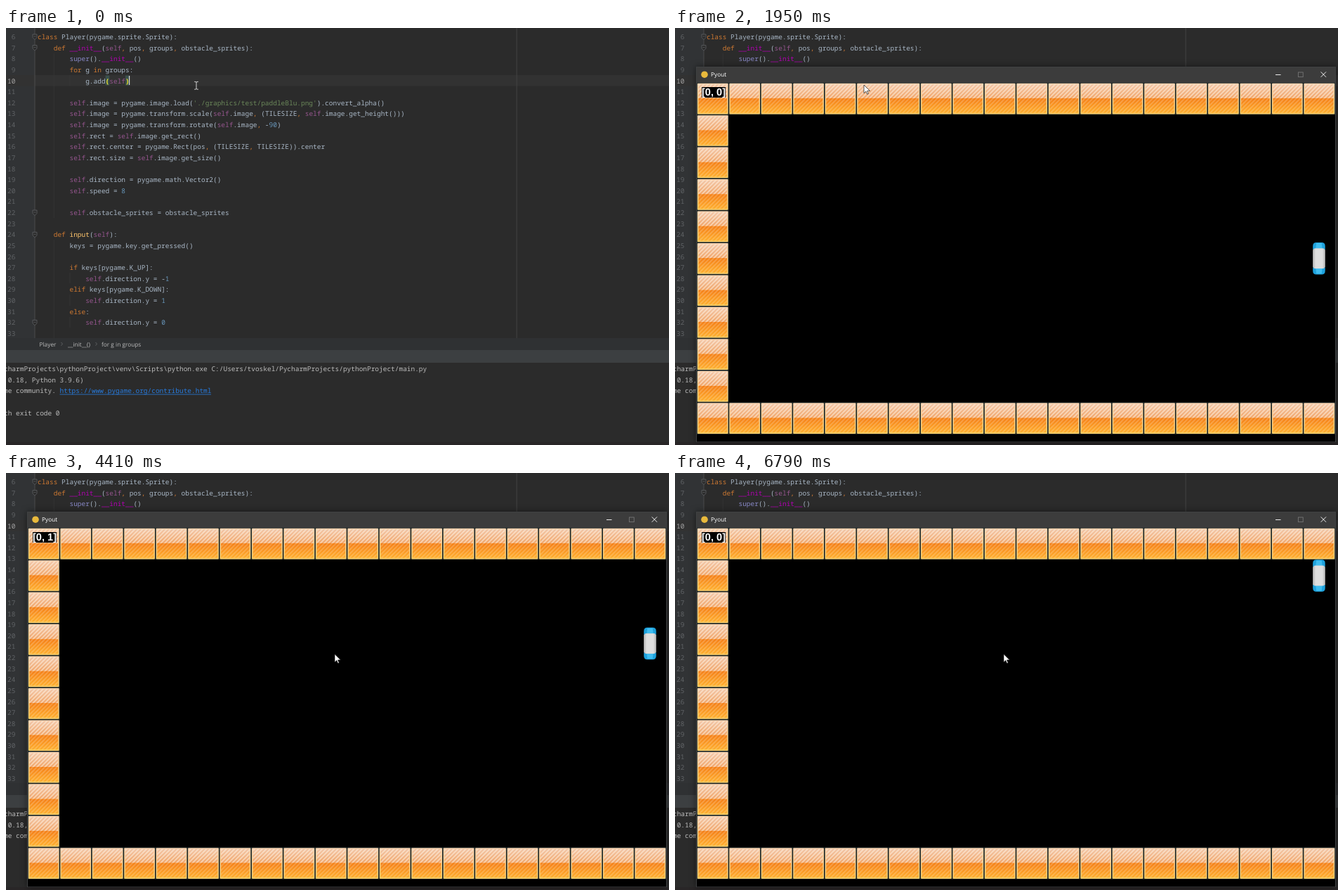
An HTML page that plays this animation: 944 px wide and 593 px high, repeating every 7.15 s.

```html
<!DOCTYPE html>
<html lang="en">
<head>
<meta charset="utf-8">
<title>Paddle demo</title>
<style>
  html, body { margin: 0; width: 100%; height: 100%; overflow: hidden; background: #2b2b2b; }
  svg { display: block; width: 944px; height: 593px; }
  text { white-space: pre; text-rendering: geometricPrecision; }
  .mono { font: 9.47px "Noto Sans Mono", monospace; fill: #a9b7c6; }
  .ui { font: 8.3px "Open Sans", sans-serif; fill: #bbb; }
  .num { fill: #606366; text-anchor: end; }
  .num.cur { fill: #a4a3a3; }
  .out { fill: #bbb; }
  .kw { fill: #cc7832; }
  .self { fill: #94558d; }
  .dunder { fill: #b200b2; }
  .builtin { fill: #8888c6; }
  .fn { fill: #ffc66d; }
  .str { fill: #6a8759; }
  .lit { fill: #6897bb; }
  .match { fill: #ffef28; font-weight: bold; }
  .label { font: bold 14.6px "Liberation Sans", Arial, sans-serif; fill: #fff; }
  .frame { filter: drop-shadow(0 0 5px rgba(0, 0, 0, .5)); }
</style>
</head>
<body>
<svg viewBox="0 0 944 593">
  <defs>
    <linearGradient id="edge" x2="0" y2="1">
      <stop stop-color="#fbd5b2"/><stop offset="1" stop-color="#ffd069"/>
    </linearGradient>
    <linearGradient id="pale" x2="0" y2="1">
      <stop stop-color="#f3c6a6"/><stop offset="1" stop-color="#f0a468"/>
    </linearGradient>
    <linearGradient id="warm" x2="0" y2="1">
      <stop stop-color="#f47d14"/><stop offset="1" stop-color="#ffae2c"/>
    </linearGradient>
    <pattern id="hatch" width="4" height="4" patternUnits="userSpaceOnUse" patternTransform="rotate(45)">
      <rect width="1.8" height="4" fill="#fff3e4"/>
    </pattern>
    <g id="brick">
      <rect width="45.45" height="45.45" fill="#26302f"/>
      <rect x=".9" y=".9" width="43.7" height="43.7" rx="1" fill="url(#edge)"/>
      <rect x="2.4" y="2.4" width="40.7" height="19.6" fill="url(#pale)"/>
      <rect x="2.4" y="22" width="40.7" height="21" fill="url(#warm)"/>
      <rect x="2.4" y="2.4" width="40.7" height="19.6" fill="url(#hatch)" opacity=".6"/>
      <rect x="2.4" y="22" width="40.7" height="21" fill="url(#hatch)" opacity=".24"/>
    </g>
    <g id="fold" fill="#2b2b2b" stroke="#606366" stroke-width=".8">
      <path d="M-3-3.5H3V1L0 4-3 1ZM-1.5-.5H1.5"/>
    </g>
  </defs>

  <rect width="944" height="593" fill="#2b2b2b"/>
  <rect width="41" height="441" fill="#313335"/>
  <rect y="67" width="944" height="15.6" fill="#323232"/>
  <path d="M41 0V441" stroke="#555" stroke-width=".8"/>
  <path d="M727.2 0V441" stroke="#464646" stroke-width=".9"/>
  <path d="M68.2 36V270M91 67V82M91 348V363M91 379V395M91 411V426M68.2 301V441" stroke="#383838" stroke-width=".8"/>
  <path d="M141.6 67.5h5.7v14h-5.7zM170 67.5h5.7v14H170z" fill="#3b514d"/>
  <g id="code"></g>
  <rect y="441" width="944" height="17" fill="#2f3133"/>
  <rect y="458" width="944" height="18" fill="#3c3f41"/>
  <g class="ui">
    <text x="47.5" y="452.6">Player</text>
    <text x="88" y="452.6">__init__()</text>
    <text x="136" y="452.6">for g in groups</text>
    <path d="M78.5 447l2 2.3-2 2.3M127.5 447l2 2.3-2 2.3" fill="none" stroke="#6a6d6f" stroke-width=".8"/>
  </g>
  <g class="mono">
    <text class="out" x="-3" y="488">charmProjects\pythonProject\venv\Scripts\python.exe C:/Users/tvoskel/PycharmProjects/pythonProject/main.py</text>
    <g id="banner">
      <text class="out" x="-3" y="503.7"> 0.18, Python 3.9.6)</text>
      <text class="out" x="-3" y="519.3">me community. <tspan fill="#287bde">https://www.pygame.org/contribute.html</tspan></text>
      <path d="M76.5 521H292" stroke="#287bde" stroke-width=".8"/>
    </g>
    <text id="exit" class="out" x="-3" y="550.6">th exit code 0</text>
  </g>
  <rect y="589" width="944" height="4" fill="#292627"/>
  <rect id="caret" x="175" y="68" width="1.2" height="13" fill="#ddd"/>

  <g id="win">
    <rect class="frame" x="30" y="55" width="911" height="534" fill="#3f4142"/>
    <rect x="31" y="56" width="909" height="22" fill="#3c3c3c"/>
    <circle cx="42" cy="66.2" r="4.8" fill="#e9b93c"/>
    <text class="ui" x="51" y="69.4" style="fill:#fff">Pyout</text>
    <g fill="none" stroke="#fff" stroke-width=".9">
      <path d="M855 66.5h7.5M919.6 62.4l7.4 7.4M927 62.4l-7.4 7.4"/>
      <rect x="887.4" y="63" width="6.8" height="6.6" stroke="#757575"/>
    </g>
    <rect x="31" y="78" width="909" height="510.3"/>
    <g id="bricks" transform="translate(31 77.8)"></g>
    <rect id="plate" x="38" y="84" height="15"/>
    <text id="label" class="label" x="38" y="96.2"></text>
    <g id="paddle">
      <path d="M0 10V5Q0 0 5 0H12.5Q17.5 0 17.5 5V10ZM0 35.4V40.4Q0 45.4 5 45.4H12.5Q17.5 45.4 17.5 40.4V35.4Z" fill="#1ea2dd"/>
      <path d="M5 1H12.5L13.5 9H4ZM5 44.4H12.5L13.5 36H4Z" fill="#3fbdf0"/>
      <path d="M0 10.5L2 8.5H15.5L17.5 10.5V35L15.5 37H2L0 35Z" fill="#c9c9c9"/>
      <path d="M3 8.5H14.5V37H3Z" fill="#dedede"/>
    </g>
  </g>
  <path id="beam" d="M268.2 76.4H270L271 77.2 272 76.4H273.8M271 77V86.6M268.2 87.2H270L271 86.4 272 87.2H273.8" fill="none" stroke="#e4e4e4" stroke-width=".9"/>
  <path id="arrow" d="M0 0V16.5L4 12.8 6.5 18.6 9 17.5 6.5 11.8H12Z" fill="#fff" stroke="#000" stroke-width=".9"/>
</svg>

<script>
const $ = id => document.getElementById(id);
const LOOP = 7150, CHAR = 5.682, LINE = 15.63, TILE = 45.45;

const code = `class Player(pygame.sprite.Sprite):
    def __init__(self, pos, groups, obstacle_sprites):
        super().__init__()
        for g in groups:
            g.add(self)

        self.image = pygame.image.load('./graphics/test/paddleBlu.png').convert_alpha()
        self.image = pygame.transform.scale(self.image, (TILESIZE, self.image.get_height()))
        self.image = pygame.transform.rotate(self.image, -90)
        self.rect = self.image.get_rect()
        self.rect.center = pygame.Rect(pos, (TILESIZE, TILESIZE)).center
        self.rect.size = self.image.get_size()

        self.direction = pygame.math.Vector2()
        self.speed = 8

        self.obstacle_sprites = obstacle_sprites

    def input(self):
        keys = pygame.key.get_pressed()

        if keys[pygame.K_UP]:
            self.direction.y = -1
        elif keys[pygame.K_DOWN]:
            self.direction.y = 1
        else:
            self.direction.y = 0
`.split('\n');

const syntax = new RegExp([
  "(?<str>'[^']*')",
  '(?<match>(?<=add)\\(|(?<=add\\(self)\\))',
  '(?<kw>\\b(?:class|def|for|in|if|elif|else)\\b|,)',
  '(?<self>\\bself\\b)',
  '(?<dunder>__init__)',
  '(?<builtin>\\bsuper\\b)',
  '(?<fn>\\binput\\b)',
  '(?<lit>\\b\\d+\\b)'
].join('|'), 'g');

function paint(line) {
  return line.replace(syntax, (word, ...rest) => {
    const groups = rest.at(-1);
    const kind = Object.keys(groups).find(k => groups[k]);
    return `<tspan class="${kind}">${word}</tspan>`;
  });
}

$('code').innerHTML = code.map((line, i) => {
  const y = 16 + i * LINE, n = i + 6, body = line.trimStart();
  const x = 45 + (line.length - body.length) * CHAR;
  return `<text class="mono num ${n === 10 ? 'cur' : ''}" x="13.4" y="${y}">${n}</text>` +
    `<text class="mono" x="${x}" y="${y}">${paint(body)}</text>`;
}).join('') + [6, 7, 22, 24, 32].map(n =>
  `<use href="#fold" x="41" y="${12.5 + (n - 6) * LINE}"/>`).join('');

let wall = '';
for (let row = 0; row < 11; row++) {
  const cols = row % 10 ? 1 : 20;
  for (let col = 0; col < cols; col++)
    wall += `<use href="#brick" x="${col * TILE}" y="${row * TILE}"/>`;
}
$('bricks').innerHTML = wall;

// Last row whose start time has passed
const at = (table, t) => table.findLast(row => t >= row[0]);

// start, opacity, scale
const fade = [[0, 0, 1], [1790, .5, .973], [1850, .8, .989], [1910, .95, .997], [1950, 1, 1]];
// start, vertical input
const input = [[0, 0], [3170, -1], [3970, 0], [4170, 1], [5460, 0], [5540, -1], [6790, 0]];
// first picture, movement start, game y, direction
const runs = [[0, 0, 320, 0], [3170, 3154, 320, -1], [4170, 4146, 64, 1], [5540, 5544, 576, -1]];
// pointer x, y every 40 ms
const path = [[269, 81], [283, 93], [320, 124], [372, 168], [424, 212], [460, 241], [475, 254], [473, 257], [468, 257.5]];

function paddleY(t) {
  const [first, start, from, dir] = at(runs, t);
  const shown = first + Math.floor((t - first) / 40) * 40;
  const ticks = Math.max(0, Math.round((shown - start) / 16));
  const y = Math.min(576, Math.max(64, from + dir * 8 * ticks));
  return 77.8 + y * TILE / 64;
}

const show = (id, on) => $(id).setAttribute('visibility', on ? 'visible' : 'hidden');

function draw(t) {
  show('caret', t < 40 || (t >= 150 && t < 560));
  show('exit', t < 1130);
  show('banner', t < 1130 || t >= 1340);
  show('beam', t < 1590);
  show('arrow', t >= 1590);

  const step = Math.floor((t - 2360) / 40) + 1;
  const [px, py] = path[Math.min(path.length - 1, Math.max(0, step))];
  $('arrow').setAttribute('transform', `translate(${px} ${py}) scale(.71)`);

  const [, alpha, size] = at(fade, t);
  $('win').setAttribute('opacity', alpha);
  $('win').setAttribute('transform', `translate(485.5 322) scale(${size}) translate(-485.5 -322)`);

  const dir = at(input, t)[1];
  $('label').textContent = `[0, ${dir}]`;
  $('plate').setAttribute('width', dir < 0 ? 38.9 : 34.1);
  $('paddle').setAttribute('transform', `translate(908.2 ${paddleY(t)})`);
}

const begin = performance.now();
function tick() {
  draw((performance.now() - begin) % LOOP);
  requestAnimationFrame(tick);
}
tick();
</script>
</body>
</html>
```
